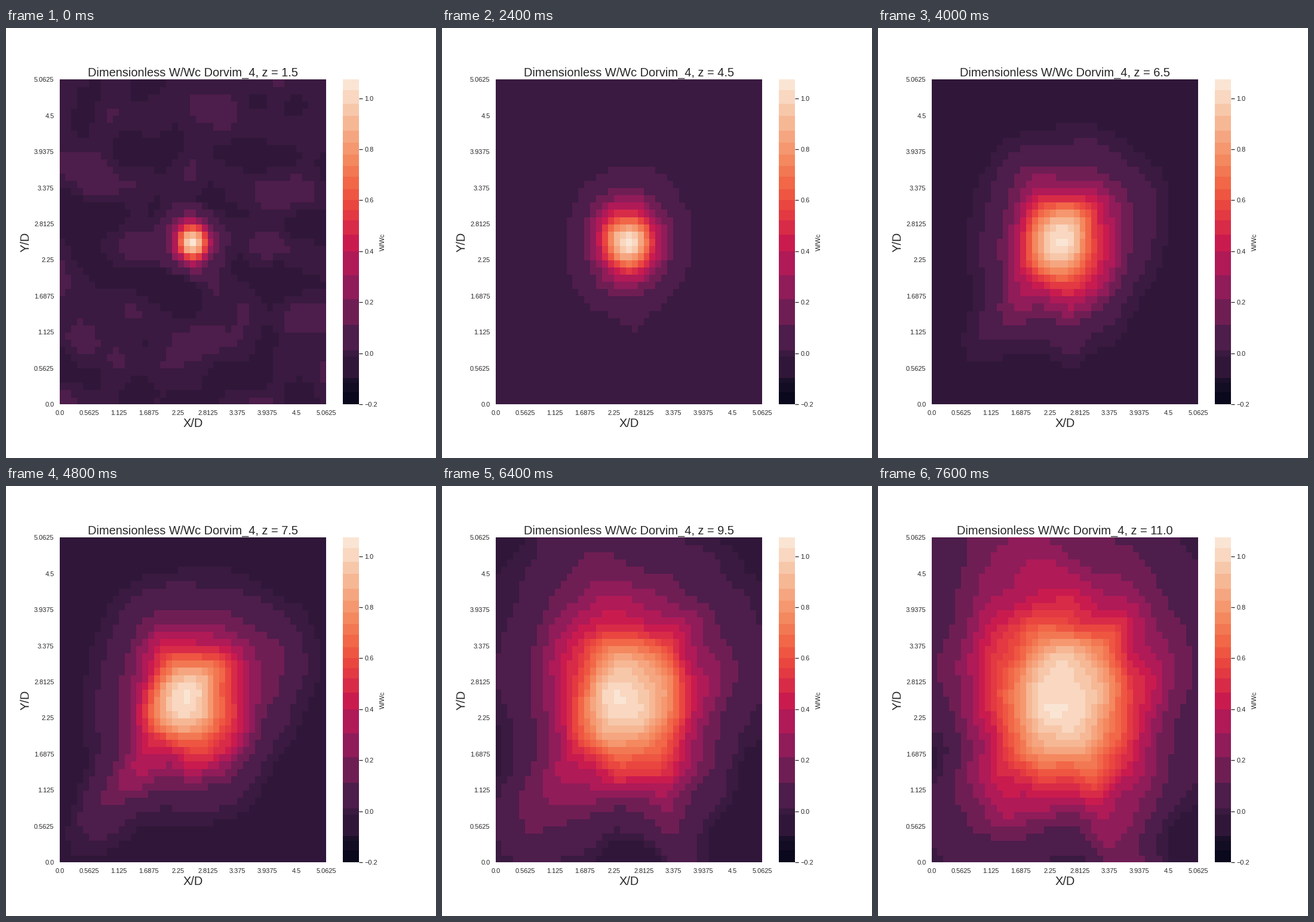
These frames come from a looping animation (720x720 px, 8 s). A matplotlib script:

```python
import numpy as np
import matplotlib.pyplot as plt
from matplotlib.animation import FuncAnimation
from matplotlib.colors import BoundaryNorm, LinearSegmentedColormap, ListedColormap

SIZE, DPI, CELLS = 720, 72, 45
FRAMES, INTERVAL = 20, 400
Z_START, Z_STEP = 1.5, 0.5
INK = "#262626"
TOP, BOTTOM = 86.4, 630.0
V_MIN, UNIT = -0.2, 427.0  # bottom of the colour scale and pixels per unit

plt.rcParams.update({
    "font.family": "Liberation Sans", "font.size": 11, "text.color": INK,
    "axes.labelcolor": INK, "xtick.color": INK, "ytick.color": INK,
})

# Banded colour scale: band limits by height on the colour bar
band_y = np.array([BOTTOM, 610, 594, 586, 550, 540, 497, 454, 414, 374, 346, 322,
                   305, 288, 270, 249, 231, 212, 192, 172, 147, 127, 104, TOP])
limits = V_MIN + (BOTTOM - band_y) / UNIT
middles = (BOTTOM - (band_y[1:] + band_y[:-1]) / 2) / (BOTTOM - TOP)
ramp = LinearSegmentedColormap.from_list("ramp", [
    (0, "#03051a"), (.071, "#1a1028"), (.114, "#301739"), (.156, "#3a1a40"),
    (.2, "#4b1d4a"), (.333, "#841e5a"), (.4, "#a11a5b"), (.5, "#cb1b4f"),
    (.6, "#e83f3f"), (.667, "#f06043"), (.75, "#f4875e"), (.857, "#f6b48f"),
    (1, "#faebdd")], N=1024)
bands = ListedColormap(ramp(middles))
norm = BoundaryNorm(limits, bands.N)

gx, gy = np.meshgrid(*[np.arange(CELLS) + 0.5 - CELLS / 2] * 2)

# Bulges and dents of the plume: angle, angular width, z of most effect, z span, strength
LOBES = [
    (225, 14, 8, 2, .55),
    (20, 25, 7.8, 1.5, .25),
    (105, 25, 11, 2, .4),
    (275, 10, 5.5, 1, .25),
    (322, 25, 11, 5, -.25),
    (268, 18, 11, 2.5, -.3),
    (295, 10, 10.5, 1.5, .35),
    (200, 15, 11, 1.5, -.3),
]


def ripple(seed, z, waves=24):
    """Smooth noise of unit spread that drifts slowly with z."""
    rng = np.random.default_rng(seed)
    total = np.zeros_like(gx)
    for _ in range(waves):
        k = 2 * np.pi / rng.uniform(7, 18)
        turn, phase, drift = rng.uniform(0, 2 * np.pi, 3)
        total += np.cos(k * (gx * np.cos(turn) + gy * np.sin(turn))
                        + phase + 0.2 * drift * z)
    return total * np.sqrt(2 / waves)


def field(z):
    """Gaussian jet that widens with z, bent by lobes and ragged at the edge."""
    width = np.interp(z, [1.5, 3.5, 5.5, 8.5, 11], [2.2, 3.0, 5.15, 8.25, 12.2])
    floor = np.interp(z, [1.5, 3.5, 5.5, 7], [-.004, .004, -.012, -.03])
    core = np.exp(-2 * (gx ** 2 + gy ** 2) / width ** 2)
    x = gx + width * (0.1 * core + 0.05 * ripple(1, z))
    y = gy + width * 0.05 * ripple(2, z)

    angle = np.degrees(np.arctan2(y, x))
    squareness = 0.05 * (z - Z_START) / (Z_STEP * (FRAMES - 1))
    s = np.hypot(x, y) / (width * (1 - squareness * np.cos(np.radians(4 * angle))))
    stretch = np.zeros_like(s)
    for direction, spread, peak, span, strength in LOBES:
        off = (angle - direction + 180) % 360 - 180
        stretch += strength * np.exp(-(off / spread) ** 2 - ((z - peak) / span) ** 2)
    s /= 1 + np.clip((s - 1) / 1.2, 0, 1) * stretch

    eddies = 0.015 * np.exp(-0.6 * (z - Z_START)) * ripple(3, z)
    value = floor + (1.04 - floor) * np.exp(-0.619 * s ** 2) + eddies
    return np.clip(value, limits[0], limits[-1] - 1e-6)


def pixel_axes(left, right):
    ax = fig.add_axes([left / SIZE, 1 - BOTTOM / SIZE,
                       (right - left) / SIZE, (BOTTOM - TOP) / SIZE])
    ax.spines[:].set_visible(False)
    return ax


fig = plt.figure(figsize=(SIZE / DPI, SIZE / DPI), dpi=DPI, facecolor="white")

ax = pixel_axes(90, 536.4)
cell_edges = np.arange(CELLS + 1) - 0.05  # half a pixel, so edges round down
cell_edges[-1] = CELLS
mesh = ax.pcolormesh(cell_edges, cell_edges, field(Z_START), cmap=bands, norm=norm)
ax.set(xlim=(0, CELLS), ylim=(0, CELLS))
ticks = np.arange(0, CELLS + 1, 5)
names = ["0.0"] + [f"{n * 0.1125:.4f}".rstrip("0") for n in ticks[1:]]
ax.set_xticks(ticks, names)
ax.set_yticks(ticks, names)
ax.tick_params(length=0, pad=9.5)
ax.set_xlabel("X/D", fontsize=20)
ax.set_ylabel("Y/D", fontsize=20)
title = ax.set_title("", fontsize=20, pad=6)

bar = pixel_axes(564, 591)
bar.pcolormesh([0, 1], limits, (limits[1:] + limits[:-1])[:, None] / 2,
               cmap=bands, norm=norm)
bar.set_xticks([])
bar.yaxis.tick_right()
bar.yaxis.set_label_position("right")
marks = np.arange(-1, 6) / 5
bar.set_yticks(marks, [f"{v:.1f}".replace("-", "\u2212") for v in marks])
bar.set_ylim(limits[0], limits[-1])
bar.tick_params(length=6, width=1.25, pad=3.5)
bar.set_ylabel("W/Wc", fontsize=11)


def update(frame):
    z = Z_START + Z_STEP * frame
    mesh.set_array(field(z))
    title.set_text(f"Dimensionless W/Wc Dorvim_4, z = {z:.1f}")
    return mesh, title


anim = FuncAnimation(fig, update, frames=FRAMES, interval=INTERVAL,
                     repeat=True, repeat_delay=0, blit=False)
plt.show()
```
